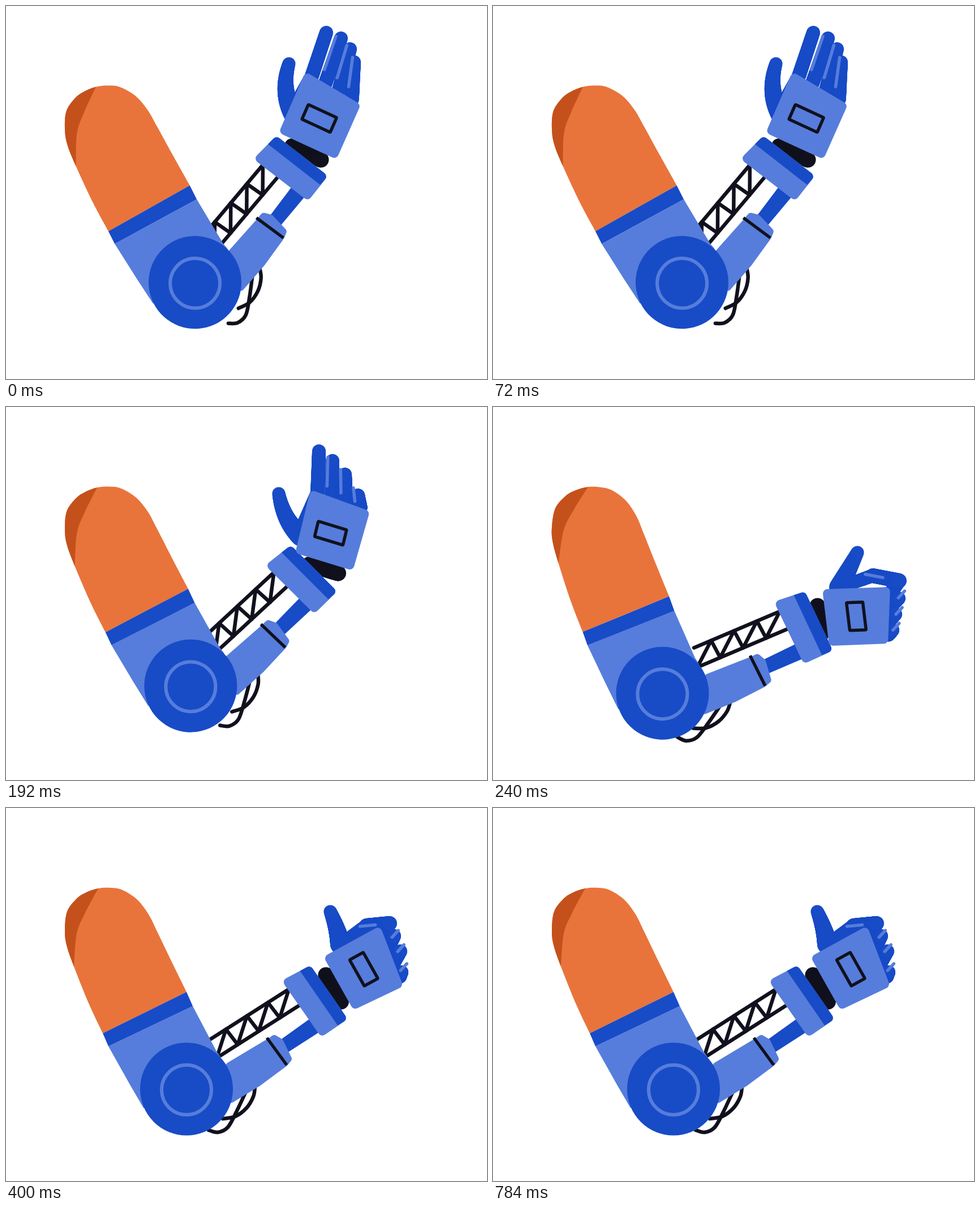
Animation of 850 by 659 pixels, one loop 1.04 s. Source, as an HTML page with a canvas:

```html
<!DOCTYPE html>
<html lang="en">
<head>
<meta charset="utf-8">
<title>Robot arm thumbs up</title>
<style>
  html, body { margin: 0; width: 100%; height: 100%; overflow: hidden; background: #fff; }
  canvas { display: block; }
</style>
</head>
<body>
<canvas id="stage" width="850" height="659"></canvas>
<script>
const ctx = document.getElementById('stage').getContext('2d');
const ORANGE = '#e8743b', RUST = '#c4511b', LIGHT = '#567ddb', BLUE = '#184bc6', INK = '#11111e';
const LOOP = 1040, SHOULDER = [175, 215], FOREARM = [512, 385.5];

// The arms are rigid and drawn in the resting pose; "arm" and "turn" are degrees away from it.
// palm: wrist at thumb, index knuckle, little knuckle, wrist below. thumb: base, bend, tip.
// curl: where the index finger folds back in a fist.
const poses = [
  { until: 120, arm: -3.1, fore: [485, 339.5], turn: -17.4,
    palm: [[482, 224], [529, 116], [627, 174], [584, 271]],
    thumb: [[508, 190], [485, 150], [500, 102]],
    tips: [[566, 47], [592, 57], [608, 76], [615, 99]] },
  { until: 240, arm: -1.5, fore: [497, 354.5], turn: -10.3,
    palm: [[511, 258], [538, 146], [643, 184], [613, 289]],
    thumb: [[521, 228], [490, 200], [482, 153]],
    tips: [[553, 78], [577, 95], [599, 119], [622, 156]] },
  { until: 320, arm: 3.9, fore: [508, 427.5], turn: 9.5,
    palm: [[582, 322], [702, 318], [698, 418], [594, 422]],
    thumb: [[612, 319], [628, 288], [644, 257]],
    tips: [[718, 307], [717, 338], [711, 366], [706, 394]], curl: [671, 298] },
  { until: 400, arm: 2.6, fore: [510, 409], turn: 4.6,
    palm: [[577, 293], [686, 265], [711, 370], [601, 389]],
    thumb: [[610, 277], [615, 243], [616, 210]],
    tips: [[700, 255], [709, 279], [714, 305], [719, 337]], curl: [662, 256] },
  { until: LOOP, arm: 0, fore: FOREARM, turn: 0,
    palm: [[561, 263], [661, 208], [702, 315], [614, 357]],
    thumb: [[591, 241], [586, 213], [573, 183]],
    tips: [[678, 204], [686, 226], [697, 253], [699, 290]], curl: [637, 208] }
];

const mix = (p, q, t) => [p[0] + (q[0] - p[0]) * t, p[1] + (q[1] - p[1]) * t];
const shift = (p, dx, dy) => [p[0] + dx, p[1] + dy];
const points = text => text.split(' ').map(pair => pair.split(',').map(Number));

// Closed polygon with rounded corners
function polygon(pts, radius = 0) {
  const path = new Path2D(), n = pts.length;
  path.moveTo(...mix(pts[n - 1], pts[0], 0.5));
  pts.forEach((p, i) => path.arcTo(...p, ...pts[(i + 1) % n], radius));
  path.closePath();
  return path;
}

// Smooth open curve through the points
function curve(pts) {
  const path = new Path2D(), last = pts.length - 1;
  const handle = (i, side) => {
    const a = pts[Math.max(0, i - 1)], b = pts[Math.min(last, i + 1)];
    return shift(pts[i], side * (b[0] - a[0]) / 6, side * (b[1] - a[1]) / 6);
  };
  path.moveTo(...pts[0]);
  for (let i = 0; i < last; i++) path.bezierCurveTo(...handle(i, 1), ...handle(i + 1, -1), ...pts[i + 1]);
  return path;
}

function line(pts) {
  const path = new Path2D();
  pts.forEach(p => path.lineTo(...p));
  return path;
}

function disc(center, radius) {
  const path = new Path2D();
  path.arc(...center, radius, 0, 2 * Math.PI);
  return path;
}

function fill(path, color) {
  ctx.fillStyle = color;
  ctx.fill(path);
}

function stroke(path, color, width) {
  ctx.strokeStyle = color;
  ctx.lineWidth = width;
  ctx.stroke(path);
}

function fillInside(mask, path, color) {
  ctx.save();
  ctx.clip(mask);
  fill(path, color);
  ctx.restore();
}

// Tapering limb from a to c, bending towards b
function limb(a, b, c, from, to, color = BLUE) {
  for (let t = 0; t <= 1; t += 1 / 64)
    fill(disc(mix(mix(a, b, t), mix(b, c, t), t), from + (to - from) * t), color);
}
const bar = (a, b, from, to, color) => limb(a, mix(a, b, 0.5), b, from, to, color);

// Runs draw() with the point "from" moved to "to" and turned around it
function turned(from, to, degrees, draw) {
  ctx.save();
  ctx.translate(...to);
  ctx.rotate(degrees * Math.PI / 180);
  ctx.translate(-from[0], -from[1]);
  draw();
  ctx.restore();
}

function drawTruss() {
  const brace = [];
  for (let x = 0; x < 170; x += 44) brace.push([x, 0], [x + 41, -34]);
  [line([[0, 0], [165, 0]]), line([[0, -34], [170, -34]]), line(brace)].forEach(p => stroke(p, INK, 6.5));
}

function drawForearm() {
  stroke(curve(points('440,493 437,510 425,530 405,545 383,549')), INK, 6.5);
  stroke(curve(points('423,503 408,535 392,564 374,573 358,569')), INK, 6.5);
  turned([0, 0], [500, 320], 147.5, drawTruss);
  fill(polygon(points('536,373 552,397 496,433 483,411')), BLUE);
  fill(polygon(points('390,451 462,408 474,400 489,409 506,444 497,455 450,490 398,522 360,500'), 6), LIGHT);
  ctx.lineCap = 'butt';
  stroke(line(points('461,406 496,454')), INK, 5.5);
  ctx.lineCap = 'round';
  const cuff = polygon(points('538,278 604,373 557,405 487,305'), 8);
  fill(cuff, LIGHT);
  fillInside(cuff, polygon(points('538,278 604,373 586,384 519,287')), BLUE);
}

function drawUpperArm() {
  const sleeve = curve(points('171,398 147,347 120,280 107,242 104,215 108,183 124,161 140,150 163,142 186,141 206,145 232,162 252,188 267,218 292,270 319,325'));
  const shade = curve(points('163,142 140,185 125,222 120,280'));
  shade.lineTo(80, 290);
  shade.lineTo(80, 130);
  fill(sleeve, ORANGE);
  fillInside(sleeve, shade, RUST);
  fill(polygon(points('330,350 372,430 380,441 319,496 243,530 218,487 181,421')), LIGHT);
  fill(polygon(points('319,325 330,350 181,421 171,398')), BLUE);
  fill(disc([319, 496.5], 82), BLUE);
  stroke(disc([319, 498], 44), LIGHT, 6);
}

function drawWrist([top, , , bottom]) {
  const [dx, dy] = [bottom[0] - top[0], bottom[1] - top[1]], out = 12 / Math.hypot(dx, dy);
  const spot = t => shift(mix(top, bottom, t), -dy * out, dx * out);
  bar(spot(0.28), spot(0.78), 14, 14, INK);
}

function drawHand({ palm, thumb, tips, curl }) {
  const [wrist, index, little, heel] = palm;
  const base = i => mix(index, little, 0.12 + 0.24 * i);
  limb(...thumb, 18, 11.5);
  bar(thumb[0], curl || base(0), curl ? 11 : 16, 12);
  tips.forEach((tip, i) => bar(base(i), tip, 12.5, 12));
  if (curl) {
    bar(curl, tips[0], 13, 13);
    stroke(line([mix(curl, tips[0], -0.28), mix(curl, tips[0], 0.38)]), LIGHT, 5.5);
  }
  // Creases between neighbouring fingers
  for (let i = 0; i < 3; i++) {
    const gap = mix(tips[i], tips[i + 1], 0.65), root = mix(base(i), base(i + 1), 0.65);
    const crease = curl ? [shift(gap, -1, 10), shift(gap, 10, -2)] : [gap, mix(gap, root, 0.75)];
    stroke(line(crease), LIGHT, 5.5);
  }
  fill(polygon(palm, 8), LIGHT);
  const spot = (a, b) => shift(wrist,
    a * (index[0] - wrist[0]) + b * (heel[0] - wrist[0]),
    a * (index[1] - wrist[1]) + b * (heel[1] - wrist[1]));
  stroke(polygon([spot(0.33, 0.25), spot(0.57, 0.25), spot(0.57, 0.74), spot(0.33, 0.74)], 1), INK, 5.5);
}

function render(now) {
  const time = now % LOOP;
  const pose = poses.find(p => time < p.until);
  ctx.fillStyle = '#fff';
  ctx.fillRect(0, 0, 850, 659);
  ctx.lineCap = ctx.lineJoin = 'round';
  drawWrist(pose.palm);
  turned(FOREARM, pose.fore, pose.turn, drawForearm);
  turned(SHOULDER, SHOULDER, pose.arm, drawUpperArm);
  drawHand(pose);
}

const begin = performance.now();
function tick() {
  render(performance.now() - begin);
  requestAnimationFrame(tick);
}
tick();
</script>
</body>
</html>
```
